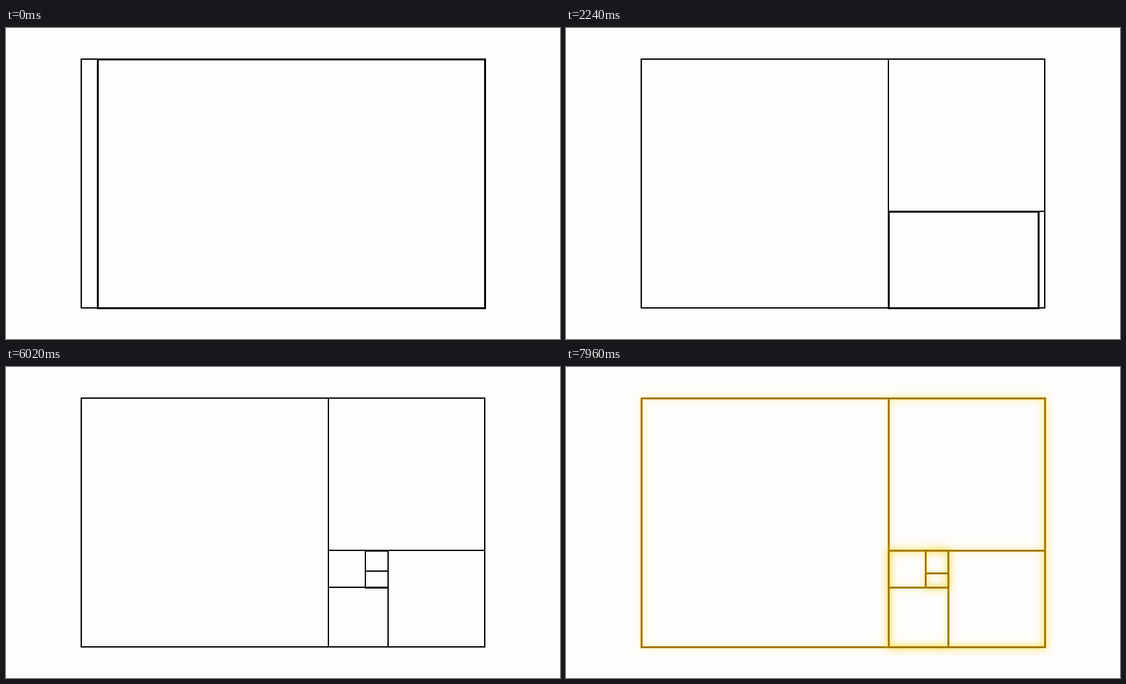
Write an HTML page that moves like this. It is 854x480 px and loops after 8000 ms.

```html
<!DOCTYPE html>
<html lang="en">
<head>
<meta charset="utf-8">
<title>Golden rectangles</title>
<style>
  html, body { margin: 0; width: 100%; height: 100%; overflow: hidden; background: #fefdfb; }
  div { position: absolute; box-sizing: border-box; border: 2px solid #000; }
</style>
</head>
<body>
<script>
const LOOP = 8000, STEP = 1120, LEAD = 58, DURATION = 750;
const outer = [116, 48, 738, 432];           // left, top, right, bottom
const targets = [497, 283, 589, 340, 554, 318]; // step i moves edge i % 4

const boxes = Array.from({ length: targets.length + 1 },
  () => document.body.appendChild(document.createElement('div')));

// CSS "ease": cubic-bezier(.25, .1, .25, 1)
function ease(x) {
  if (x <= 0) return 0;
  if (x >= 1) return 1;
  let lo = 0, hi = 1;
  for (let i = 0; i < 20; i++) {
    const s = (lo + hi) / 2;
    if (.75 * s * (1 - s) + s ** 3 < x) lo = s; else hi = s;
  }
  return .3 * lo * (1 - lo) ** 2 + 3 * (1 - lo) * lo * lo + lo ** 3;
}

const progress = (t, step) => ease((t - step * STEP + LEAD) / DURATION);

function draw(t) {
  const p = targets.map((_, i) => progress(t, i));
  const moving = p.findIndex(v => v > 0 && v < 1);
  const glow = progress(t, 6) - progress(t, 7);
  const color = `rgb(${265 * glow}, ${196 * glow}, 0)`;
  const shadow = `0 0 ${20 * glow}px rgba(255, 205, 0, ${.4 * glow})`;

  boxes.forEach((box, k) => {
    const edges = [...outer];
    for (let i = 0; i < k; i++) edges[i % 4] += (targets[i] - edges[i % 4]) * p[i];
    const [left, top, right, bottom] = edges.map(Math.round);
    const thick = glow > 0 || k < 6 && (moving >= 0 && k > moving || k === 5 && p[4] > 0);
    const rows = thick ? 3 : 2;
    const columns = thick && moving % 2 !== 1 ? 3 : 2;
    Object.assign(box.style, {
      left: left - 1 + 'px',
      top: top - 1 + 'px',
      width: right - left + columns + 'px',
      height: bottom - top + rows + 'px',
      borderWidth: `${rows}px ${columns}px`,
      borderColor: color,
      boxShadow: glow ? `${shadow}, inset ${shadow}` : 'none'
    });
  });
}

const start = performance.now();
function tick() {
  draw((performance.now() - start) % LOOP);
  requestAnimationFrame(tick);
}
tick();
</script>
</body>
</html>
```
